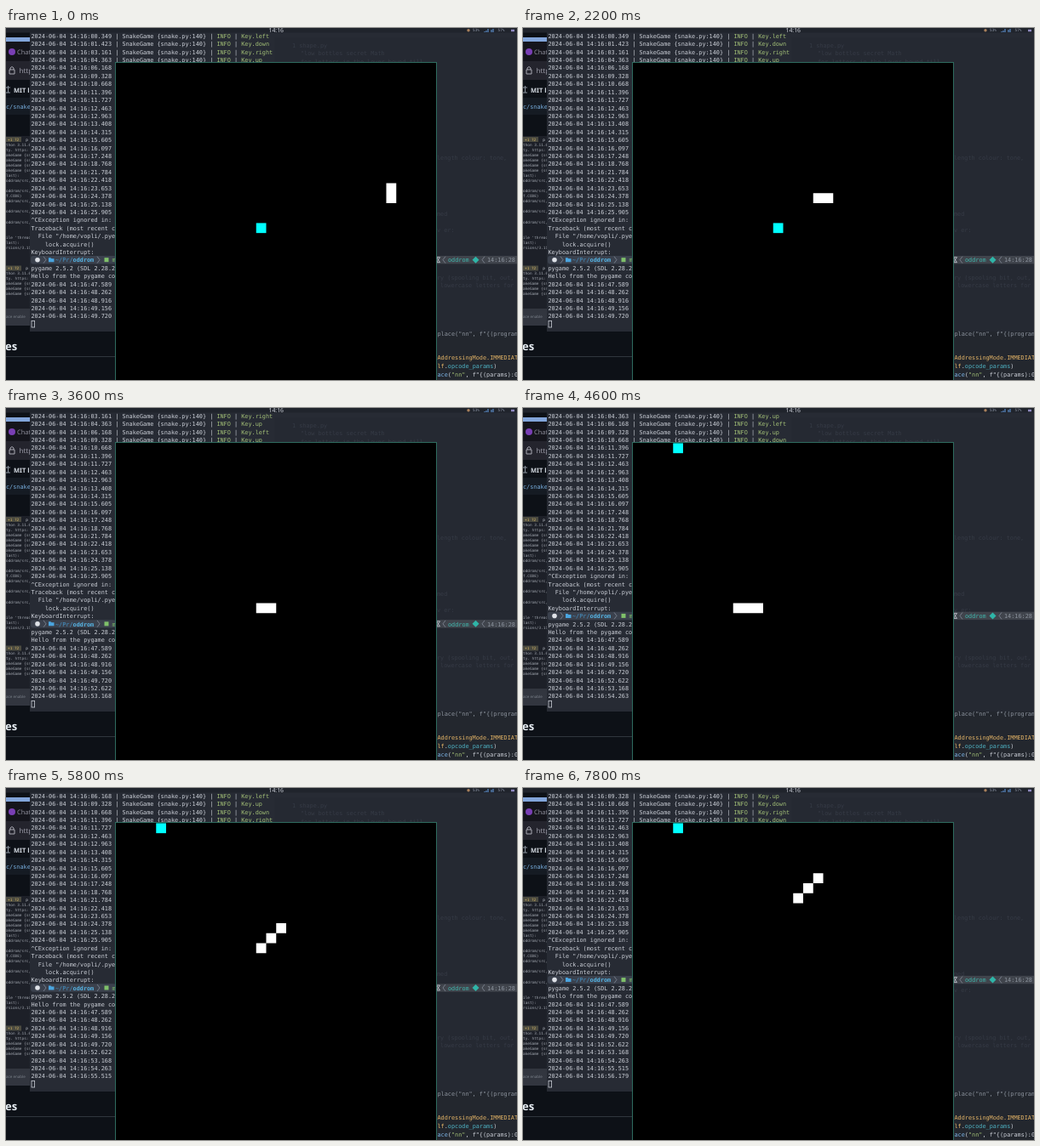
An HTML page for the animation above (8000 ms loop, 600 by 414 pixels).

```html
<!DOCTYPE html>
<html lang="en">
<head>
<meta charset="utf-8">
<title>Snake</title>
<style>
html, body { margin: 0; width: 100%; height: 100%; overflow: hidden; background: #0d1117; }
svg { display: block; width: 600px; height: 414px; }
text { white-space: pre; text-rendering: geometricPrecision; font-family: "DejaVu Sans Mono", monospace; font-size: 6.84px; }
.ui { font-family: "Noto Sans", sans-serif; }
.tiny { font-size: 4.4px; }
</style>
</head>
<body>
<svg viewBox="0 0 600 414">
  <g id="browser">
    <rect width="129" height="414" fill="#0d1117"/>
    <rect y="11" width="28" height="5" fill="#82a5da"/>
    <rect y="16" width="28" height="23" fill="#15151c"/>
    <rect y="39" width="28" height="22" fill="#24242d"/>
    <circle cx="7" cy="28" r="4" fill="#7a3fb5"/>
    <path d="M4 49h6v5h-6zM5 49v-2q2-3 4 0v2" fill="none" stroke="#a8a8b2"/>
    <path d="M0 70h5M2.5 68v8M0 76h5" stroke="#8b949e" fill="none"/>
    <rect y="82" width="28" height="20" fill="#151b23"/>
    <rect y="127" width="28" height="203" fill="#1d2028"/>
    <rect y="330" width="28" height="20" fill="#32363f"/>
    <path d="M0 386.5h129" stroke="#30363d"/>
  </g>
  <rect x="505" y="357" width="95" height="57" fill="#23272e"/>
  <rect x="28" width="572" height="357" fill="#272b34"/>
  <rect x="315" y="11" width="285" height="346" fill="#252932"/>
  <g id="labels"></g>
  <g id="log"></g>
  <rect x="30" y="344.5" width="3.6" height="7.5" fill="none" stroke="#c8ccd4" stroke-width=".8"/>
  <rect width="600" height="5.5" fill="#20242c"/>
  <text class="ui" x="308.5" y="5.3" fill="#d0d4dc">14:16</text>
  <g id="tray">
    <circle cx="543" cy="2.8" r="1.7" fill="#a8805c"/>
    <text class="tiny" x="548" y="4.4" fill="#8d95a5">53%</text>
    <path d="M562 5v-1M564 5v-2M566 5v-4M570 5v-3M572 5v-4" stroke="#5b8cc8" stroke-width="1.2"/>
    <text class="tiny" x="577.5" y="4.4" fill="#8d95a5">57%</text>
    <path d="M593 3h4" stroke="#8f8ac0" stroke-width="2.500"/>
  </g>
  <rect x="128.5" y="40.5" width="377" height="380" fill="#000" stroke="#2f6b5f"/>
  <rect id="food" width="11.75" height="11.75" fill="#0ff"/>
  <path id="snake" fill="#fff"/>
</svg>
<script>
const $ = id => document.getElementById(id);
const NS = "http://www.w3.org/2000/svg";
const LOOP = 8000, TICK = 200, ROW = 9.417, CELL = 11.75, BASE = 2.8;
const LIGHT = "#ccd0d8", DIM = "#363b46", GREEN = "#a3c077", ORANGE = "#e5b567", CYAN = "#4fb3c4";

function add(parent, tag, attrs, content) {
  const el = document.createElementNS(NS, tag);
  for (const k in attrs) el.setAttribute(k, attrs[k]);
  if (content) el.textContent = content;
  return parent.appendChild(el);
}
// Each run is [text, colour, weight].
function addText(parent, x, y, runs, style = "", cls = "") {
  const el = add(parent, "text", { x, y, style, class: cls });
  for (const [s, fill, weight = 400] of runs) add(el, "tspan", { fill, "font-weight": weight }, s);
}

// Page behind the terminal
const page = $("browser");
const ui = (x, y, s, fill, size, weight) =>
  addText(page, x, y, [[s, fill, weight]], `font-size:${size}px`, "ui");
ui(13, 31, "Chats", "#8c8c98", 7.5);
ui(15.5, 53, "https", "#9a9aa6", 8);
ui(9, 76, "MIT license", "#d5dbe2", 7.5, 600);
ui(-1, 379, "es", "#e6edf3", 13, 700);
ui(0, 341, "ace enable", "#7a808a", 4.5);
addText(page, 0, 95, [["c/snake", "#79b0e0"]]);

const GAME = "akeGame {sna", SRC = "oddrom/src,", BAND = "+1 ?2";
const session = [
  BAND, "thon 3.11.6", "ty. https:", GAME, GAME, GAME, GAME, "last):", SRC, "", SRC, "f.CODE)", SRC,
  "", SRC, "", SRC, "", "", "ile 'thread", "last):", "rsions/3.11", "", "", "",
  BAND, "thon 3.11.6", "ty. https:", GAME, GAME, GAME
];
session.forEach((s, i) => {
  const y = 131 + i * 6.06, band = s === BAND;
  if (band) add(page, "rect", { y: y - 3, width: 18, height: 6, fill: "#4a4a40" });
  addText(page, band ? 2 : 0, y + 1.6, [[s, band ? "#d9b765" : "#a4a9b2"], [band ? "   p" : "", LIGHT]], "", "tiny");
});

// Editor seen behind and below the terminal
const labels = $("labels");
const faint = [
  [336, 23, "1 shape.py"], [346, 32, "\"low bottles secret Math"], [346, 42, "for letters in the lower bound till"],
  [506, 155, "length colour: tone,"], [506, 221, "med"], [506, 240, "v er:"],
  [506, 296, "ry (spooling bit, out,"], [506, 305, " lowercase letters for"]
];
for (const [x, y, s] of faint) addText(labels, x, y, [[s, DIM]]);
addText(labels, 506.5, 362, [["place(\"nn\", f\"{(program", "#8d949f"]]);
addText(labels, 506.5, 390, [["AddressingMode.IMMEDIATE", ORANGE]]);
addText(labels, 506.5, 399.5, [["lf", ORANGE], [".", LIGHT], ["opcode_params", CYAN], [")", LIGHT]]);
addText(labels, 506.5, 409.5, [["ace", "#7db4e6"], ["(", LIGHT], ["\"nn\"", GREEN], [", f\"{(params):0", LIGHT]]);

// Terminal rows
const log = $("log"), rows = [];
const newRow = () => rows[rows.push(add(log, "g", {})) - 1];
const plain = s => addText(newRow(), 29.5, BASE, [[s, LIGHT]]);
function keyRow(time, key = "") {
  addText(newRow(), 29.5, BASE, [
    [`2024-06-04 14:16:${time} | SnakeGame {snake.py:140} | `, LIGHT],
    ["INFO", GREEN], [" | ", LIGHT], [key && "Key." + key, GREEN]
  ]);
}
function promptRow() {
  const g = newRow();
  const icon = (d, fill) => add(g, "path", { d, fill });
  const line = (d, stroke) => add(g, "path", { d, stroke, fill: "none", "stroke-width": .8 });
  add(g, "rect", { x: 29, y: -4.7, width: 100, height: 9.4, rx: 3, fill: "#3b414d" });
  add(g, "rect", { x: 505, y: -4.7, width: 95, height: 9.4, fill: "#40444c" });
  add(g, "circle", { cx: 37, cy: 0, r: 2.8, fill: "#dfe2e8" });
  icon("M50 -2.5h2.5l1 1h3v4h-6.5z", "#4aa5e0");
  icon("M115.5 -2.5h5v5h-5z", "#7fc06a");
  icon("M551.5 -4l4 4l-4 4l-4 -4z", "#2fb5a8");
  line("M44 -4l3 4l-3 4M107 -4l3 4l-3 4M516 -4l-3 4l3 4M562 -4l-3 4l3 4", "#838b99");
  line("M505.5 -3h4l-4 6h4z", LIGHT);
  addText(g, 58, BASE, [["~/Pr/", "#4594c8"], ["oddrom", "#55b4e4", 700]]);
  addText(g, 124.5, BASE, [["main", "#7fc06a"]]);
  addText(g, 519, BASE, [["oddrom", "#3fb8ae"]]);
  addText(g, 565, BASE, [["14:16:28", "#8d959f"]]);
}

const early = "00.349 01.423 03.161 04.363 06.168 09.328 10.668 11.396 11.727 12.463 12.963 13.408 " +
  "14.315 15.605 16.097 17.248 18.768 21.784 22.418 23.653 24.378 25.138 25.905";
const keys = "left down right up left up down right down".split(" ");
early.split(" ").forEach((t, i) => keyRow(t, keys[i]));
plain("^CException ignored in: ");
plain("Traceback (most recent call last):");
plain("  File \"/home/vopli/.pyenv");
plain("    lock.acquire()");
plain("KeyboardInterrupt:");
promptRow();
plain("pygame 2.5.2 (SDL 2.28.2");
plain("Hello from the pygame co");
const late = "47.589 48.262 48.916 49.156 49.720 52.622 53.168 54.263 55.515 56.179";
for (const t of late.split(" ")) keyRow(t);

// Game: one letter per tick; "up" drifts right by one cell, a dot is a pause.
const moves = "LL.LLLLL.LLLLLDDDLLL.LLUUUUUULLLUU.UU.U";
const step = { L: [-1, 0], D: [0, 1], U: [1, -1] };
const EAT = 18;
const scrollTicks = [15, 17, 23, 29, 32];
const px = col => 129.25 + col * CELL, py = row => 41.4 + row * CELL;

function draw(tick) {
  const trail = [[27, 12], [27, 13]];
  for (const m of moves.slice(0, tick)) {
    if (m === ".") continue;
    const [x, y] = trail[trail.length - 1];
    trail.push([x + step[m][0], y + step[m][1]]);
  }
  const body = trail.slice(tick > EAT ? -3 : -2);
  $("snake").setAttribute("d", body.map(([x, y]) =>
    `M${px(x)} ${py(y)}h${CELL}v${CELL}h${-CELL}z`).join(""));

  const [fx, fy] = tick > EAT ? [4, 0] : [14, 16];
  $("food").setAttribute("x", px(fx));
  $("food").setAttribute("y", py(fy));
  $("food").setAttribute("display", tick === EAT ? "none" : "inline");

  const top = scrollTicks.filter(t => t <= tick).length;
  rows.forEach((g, i) => {
    const r = i - top;
    g.setAttribute("display", r >= 0 && r < 36 ? "inline" : "none");
    g.setAttribute("transform", `translate(0 ${9 + r * ROW})`);
  });
}

let start, last = -1;
function frame(now) {
  start ??= now;
  const tick = Math.floor((now - start) % LOOP / TICK);
  if (tick !== last) draw(last = tick);
  requestAnimationFrame(frame);
}
draw(0);
requestAnimationFrame(frame);
</script>
</body>
</html>
```
